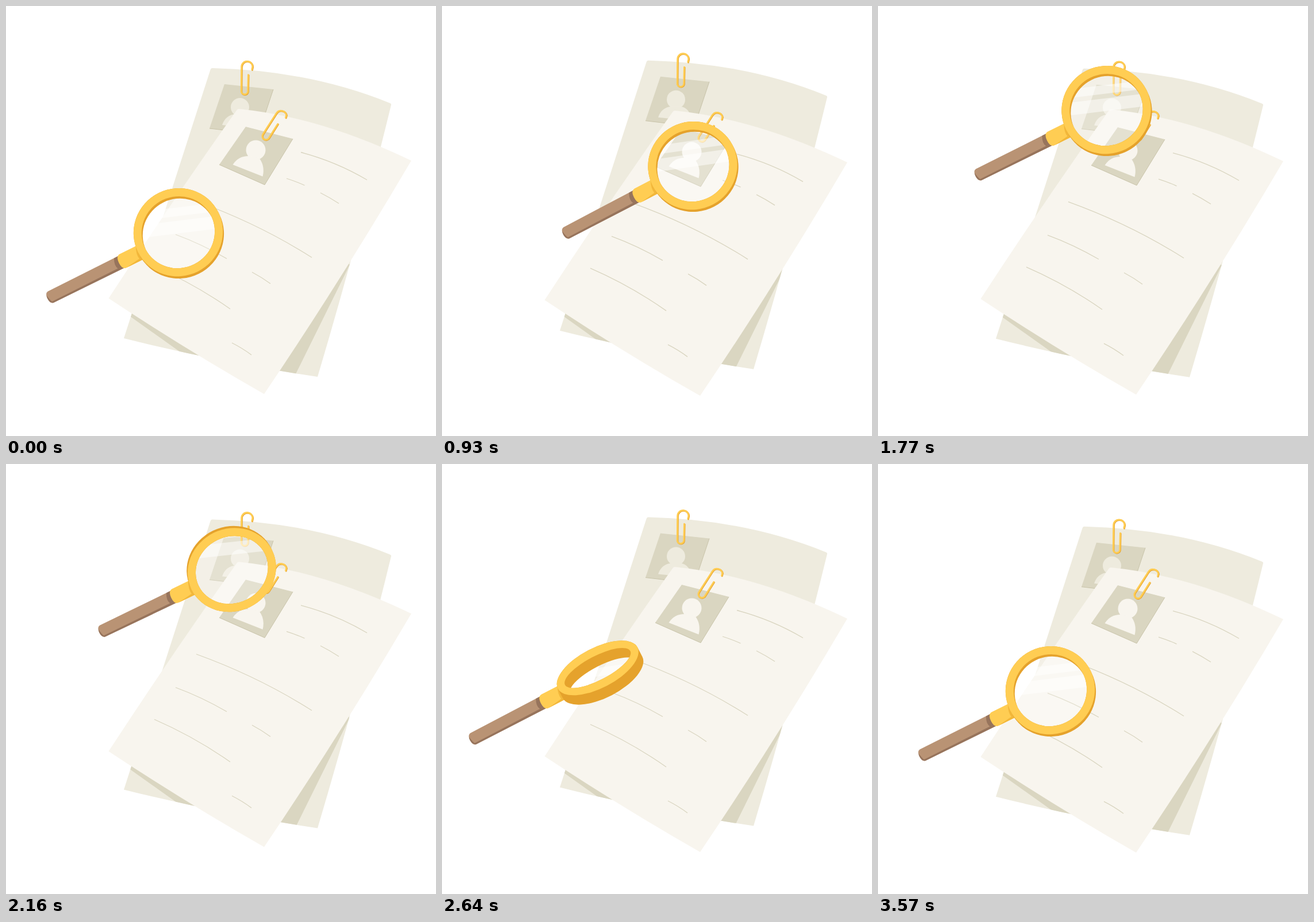
An HTML page for the animation above (3600 ms loop, 748x748 px).

```html
<!DOCTYPE html>
<html lang="en">
<head>
<meta charset="utf-8">
<title>Document search</title>
<style>
html, body { margin: 0; width: 100%; height: 100%; overflow: hidden; background: #fff; }
svg { display: block; width: 100vw; height: 100vh; }
.rule { fill: none; stroke: #d9d5c0; stroke-width: 1.3; }
.photo { fill: #dad6c1; }
.edge { fill: none; stroke: #c9c4aa; stroke-width: 1; }
.clip { fill: none; stroke-linecap: round; stroke-linejoin: round; }
.clip .lo { stroke: #e6a22d; stroke-width: 3; }
.clip .hi { stroke: #ffcd53; stroke-width: 2.8; }
</style>
</head>
<body>
<svg viewBox="0 0 748 748">
  <defs>
    <path id="sheet" d="M359 108Q528 112 668 169Q670.500 170 670 172Q612 410 542 645Q372 620 205 578L355.500 111Q356.500 108 359 108Z"/>
    <clipPath id="sheetClip"><use href="#sheet"/></clipPath>
    <clipPath id="lensClip"><path id="lensShape"/></clipPath>
    <path id="clipA" d="M421.700 120L421 149A5.800 5.800 0 0 1 409.500 149L410 106A9.600 9.600 0 0 1 429.200 106L428 111"/>
    <path id="clipB" d="M473 205.500L457.500 230A6.100 6.100 0 0 1 447 223.500L470.500 187A9.600 9.600 0 0 1 488 190L486.800 194.500"/>
  </defs>

  <g id="back">
    <use href="#sheet" fill="#eeebde"/>
    <g clip-path="url(#sheetClip)">
      <path id="shade" fill="#dad6c1" d="M404 300L190 521.500L216 540L320 614L480 689L504 640L598 450Z"/>
    </g>
    <path class="photo" d="M380 136L465 145L439 223L354 213Z"/>
    <path class="edge" d="M465 145L439 223L354 213"/>
    <g fill="#eeebde">
      <circle cx="407" cy="176" r="16"/>
      <path d="M376 207Q382 189 400 188H414Q432 190 434 213Z"/>
    </g>
    <g class="clip"><use class="lo" href="#clipA" x=".4" y=".4"/><use class="hi" href="#clipA" x="-.3" y="-.3"/></g>
  </g>

  <g id="front">
    <path fill="#f8f5ee" d="M405 179Q547 193 705 269Q584 475 449 675Q312 597 178.500 508.500Q287 342 401.500 181Q403 179 405 179Z"/>
    <path class="photo" d="M417 210L499 231L450 311L371 276Z"/>
    <path class="edge" d="M499 231L450 311L371 276"/>
    <g fill="#f8f5ee">
      <circle cx="434.500" cy="250.500" r="17"/>
      <path d="M394.500 276Q404 261 422 261L440 264Q451 278 446.500 296.500Z"/>
    </g>
    <path class="rule" d="M513 254.500Q575 271 628 302.500M488 300Q504 305 519.500 312M547 325Q563 333 579 343.500
      M331 339.500Q440 379 532 437.500M295 397.500Q340 414 384 439.500M428 463Q445 472 460 483
      M258 453Q329 484 390 527M393 586Q411 595 427 607"/>
    <g class="clip"><use class="lo" href="#clipB" x=".4" y=".4"/><use class="hi" href="#clipB" x="-.3" y="-.3"/></g>
  </g>

  <g id="glass">
    <path fill="#b99374" d="M-112 -11.500L-249 -11Q-255 -10 -255 0Q-255 10 -249 11L-112 11.500Z"/>
    <path fill="#97745c" d="M-112 -11.500H-120Q-126 0 -122 7.500L-250 8Q-252 5 -254 -6Q-256 0 -254 6Q-252 11 -248 11L-112 11.500Z"/>
    <path fill="#ffcd53" d="M-68 -13.500H-108Q-116 -13 -116 0Q-116 13 -108 13H-68Z"/>
    <path fill="#f2b73a" d="M-68 -13H-77Q-83 0 -81 9L-108 13H-68Z"/>
    <g clip-path="url(#lensClip)" fill="#fff">
      <rect x="-80" y="-90" width="160" height="180" opacity=".25"/>
      <g id="shine" opacity=".5">
        <rect x="-130" y="-45" width="260" height="15"/>
        <rect x="-130" y="-22" width="260" height="22"/>
      </g>
    </g>
    <path id="rim" fill="#e5a22c" fill-rule="evenodd"/>
    <path id="face" fill="#ffcd53" fill-rule="evenodd"/>
  </g>
</svg>
<script>
const LOOP = 3600, FLOAT = 1800, RADIUS = 78, BAND = 14, REST = 12;
const RAD = Math.PI / 180;
const set = (id, name, value) => document.getElementById(id).setAttribute(name, value);
const part = (t, a, b) => Math.min(1, Math.max(0, (t - a) / (b - a)));
const ease = u => u * u * (3 - 2 * u);
const bump = (t, a, b) => Math.sin(Math.PI * part(t, a, b)) ** 2;

// Each move adds its eased shift; together they lead back to the start
const moves = [
  { from: 30, to: 560, x: 136.5, y: -116 },
  { from: 1040, to: 1440, x: -26, y: -97 },
  { from: 1340, to: 1760, x: -13 },
  { from: 1800, to: 2160, x: -6, tilt: -35 },
  { from: 2160, to: 2630, x: -117, y: 180.5, tilt: 86.5 },
  { from: 2630, to: 3150, x: 25.5, y: 32.5, tilt: -51.5 }
];

function pose(t) {
  const p = { x: 300.5, y: 395.5, tilt: REST };
  for (const { from, to, ...shift } of moves)
    for (const key in shift) p[key] += shift[key] * ease(part(t, from, to));
  p.angle = 26.2 + .02 * p.tilt + 10.4 * bump(t, 0, 1040) + 8.6 * bump(t, 1040, 1680);
  return p;
}

function float(t, top) {
  const wave = s => Math.cos(2 * Math.PI * (s - top) / FLOAT);
  return 10 * (wave(0) - wave(t));
}

// Two half ellipses, the upper at y0 and the lower at y1
const oval = (rx, ry, y0, y1 = y0) =>
  `M${-rx} ${y0}A${rx} ${ry} 0 0 1 ${rx} ${y0}V${y1}A${rx} ${ry} 0 0 1 ${-rx} ${y1}Z`;

function drawGlass(t) {
  const { x, y, tilt, angle } = pose(t);
  const depth = tilt > 0 ? 20.7 : 10;
  const half = depth * Math.sin(tilt * RAD) / 2, h = Math.abs(half);
  const ro = RADIUS * Math.cos(tilt * RAD), ri = ro - BAND, inner = RADIUS - BAND;
  const end = inner * Math.sqrt(1 - (half / ri) ** 2);
  const opening = oval(inner, ri, -half);
  const hole = half > 0
    ? `M${-end} 0A${inner} ${ri} 0 0 1 ${end} 0A${inner} ${ri} 0 0 1 ${-end} 0Z`
    : opening;
  set('rim', 'd', oval(RADIUS, ro, -h, h) + hole);
  set('face', 'd', oval(RADIUS, ro, -half) + opening);
  set('lensShape', 'd', hole);
  set('shine', 'transform', `rotate(19.5) translate(0 ${(tilt - REST) * .7})`);
  set('glass', 'transform', `translate(${x} ${y}) rotate(${-angle})`);
}

function draw(t) {
  const front = float(t, 420), back = float(t, 675);
  set('front', 'transform', `translate(0 ${front})`);
  set('back', 'transform', `translate(0 ${back})`);
  set('shade', 'transform', `translate(0 ${front - back})`);
  drawGlass(t);
}

let start;
function tick(now) {
  start ??= now;
  draw((now - start) % LOOP);
  requestAnimationFrame(tick);
}
draw(0);
requestAnimationFrame(tick);
</script>
</body>
</html>
```
